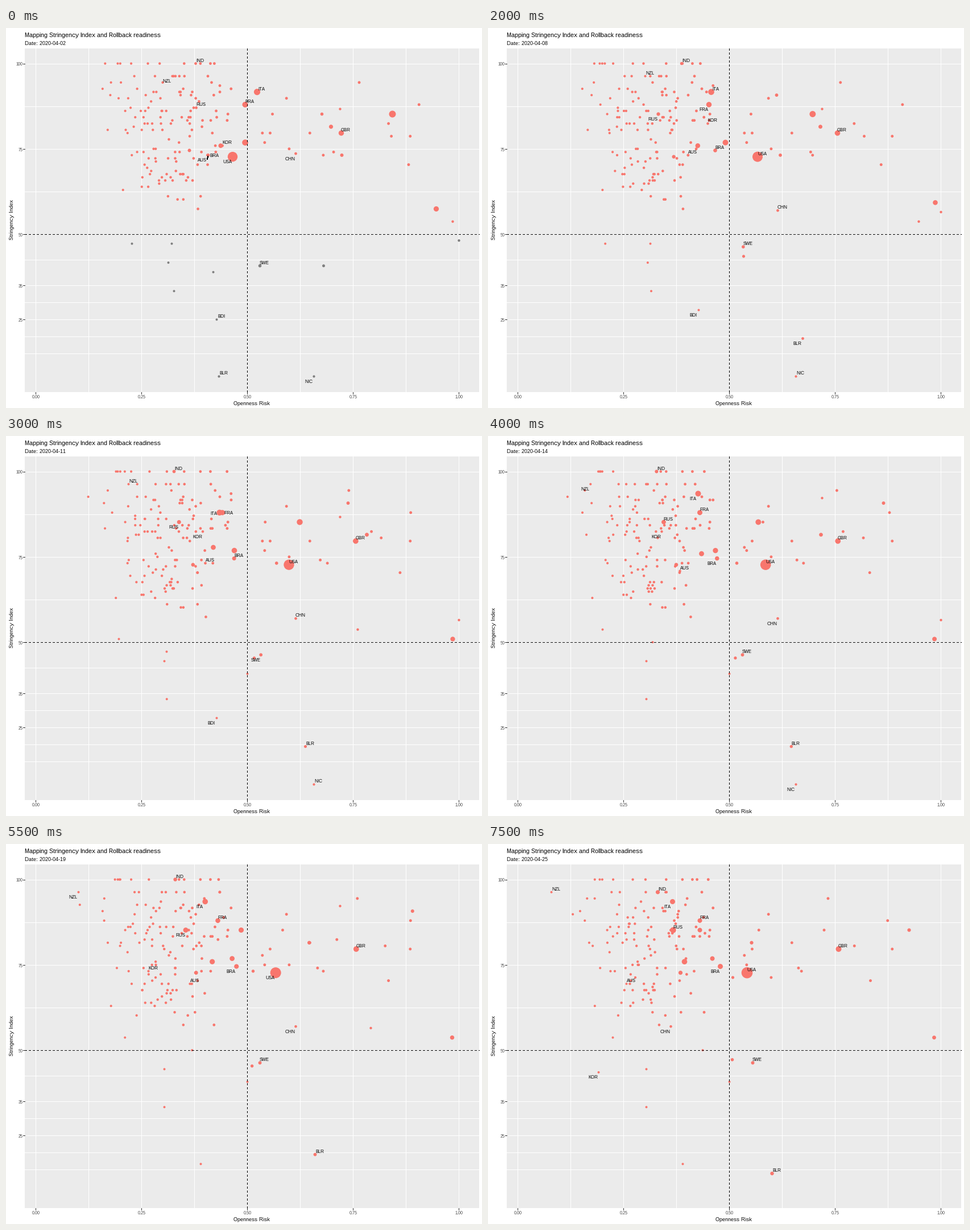
Recreate the animation shown at these times as a matplotlib script. Size 837 by 669 pixels, loop 8000 ms.

```python
import numpy as np
import matplotlib.pyplot as plt
from matplotlib.animation import FuncAnimation
from matplotlib.patches import Rectangle

W, H = 837, 669
FRAMES, STEP_MS = 16, 500
LEFT, RIGHT, TOP, BOTTOM = 33, 832, 35, 640
SALMON, GREY = "#F8766D", "#7F7F7F"
SIDES = {"n": (8, -6), "s": (-9.5, 8.5), "e": (11, 0), "w": (-10, 1)}
SIDE_TIMES = np.array([0, 2, 4, 6, 8, 11, 15])

rng = np.random.default_rng(11)
plt.rcParams.update({"font.family": "Liberation Sans",
                     "text.hinting": "native", "text.hinting_factor": 1})


def level_y(k):
    """The index moves in steps of 1/1.08 points below 100."""
    return 62 + 5.565 * np.asarray(k, float)


def index_y(v):
    return 62 + 6.01 * (100 - v)


def wander(x, k, stride, x_range, k_max):
    """Paths of many small dots: x drifts daily, the index hops now and then."""
    shape = (FRAMES, len(x))
    steps = rng.normal(-.12 * stride, stride, shape)
    steps *= rng.random(len(x)) < .65
    hops = rng.integers(-4, 5, shape) * (rng.random(shape) < .06)
    steps[0] = hops[0] = 0
    xs = np.clip(x + steps.cumsum(0), *x_range)
    ks = np.clip(k + hops.cumsum(0), 0, k_max)
    ks = np.where(ks < 3, 0, np.where(ks < 6, 4, ks))  # the top rows are sparse
    return xs, level_y(ks)


def make_crowd(n):
    """Dense upper left, narrower towards the low index values."""
    k = np.floor(54 * rng.beta(1.3, 2, n))
    x = 280 + 155 * (1 - k / 90) * rng.triangular(-1, .25, 1, n)
    return wander(x, k, 5, (69, 428), 52)


def make_stragglers(n):
    """Thin tail of dots to the right of the middle."""
    x = 428 + rng.exponential(95, n)
    return wander(x, rng.integers(6, 33, n), 9, (426, 796), 43)


class Track:
    """One country as (frame, x, index step) points, with optional label."""

    def __init__(self, name, radii, *points, sides="", last=FRAMES):
        self.name, self.radii, self.sides, self.last = name, radii, sides, last
        self.fs, self.xs, self.ks = zip(*points)
        self.text = ax.text(0, 0, name, size=8, ha="center",
                            va="center_baseline", zorder=6)

    def at(self, f):
        shown = self.fs[0] <= f <= self.last
        self.text.set_visible(shown and bool(self.name))
        if not shown:
            return []
        x = np.interp(f, self.fs, self.xs)
        y = level_y(self.ks[np.searchsorted(self.fs, f, "right") - 1])
        if self.name:
            side = self.sides[np.abs(SIDE_TIMES - f).argmin()]
            self.text.set_position((x + SIDES[side][0], y + SIDES[side][1]))
        return [(x, y, np.interp(f, [0, FRAMES - 1], self.radii))]


fig = plt.figure(figsize=(W / 72, H / 72), dpi=72, facecolor="white")
ax = fig.add_axes([0, 0, 1, 1])
ax.set(xlim=(-.5, W - .5), ylim=(H - .5, -.5))
ax.axis("off")


def line(xs, ys, color, **kw):
    return ax.plot(xs, ys, color=color, lw=1, antialiased=False,
                   solid_capstyle="butt", **kw)[0]


def label(x, y, s, size, color="black", ha="center", va="center_baseline", **kw):
    return ax.text(x, y, s, size=size, color=color, ha=ha, va=va, **kw)


# Panel, grid and axes
ax.add_patch(Rectangle((LEFT, TOP), RIGHT - LEFT, BOTTOM - TOP,
                       color="#EBEBEB", lw=0, zorder=0))
for n in range(9):
    x = 52 + 93 * n
    line([x, x], [TOP, BOTTOM], "white", zorder=1)
    if n % 2 == 0:
        line([x, x], [BOTTOM, BOTTOM + 3], "#333333")
        label(x, 649, f"{n / 8:.2f}", 8, "#4D4D4D")
for v in (100, 87.5, 75, 62.5, 50, 42.5, 35, 30, 25, 20, 15):
    y = index_y(v)
    line([LEFT, RIGHT], [y, y], "white", zorder=1)
    if v in (100, 75, 50, 35, 25):
        line([LEFT - 3, LEFT], [y, y], "#333333")
        label(29, y + 1, f"{v}", 8, "#4D4D4D", "right")
for xs, ys in (([424, 424], [BOTTOM, TOP]),
               ([LEFT, RIGHT], [index_y(50)] * 2)):
    line(xs, ys, "black", ls=(0, (3, 3)), zorder=5)
label(33, 11, "Mapping Stringency Index and Rollback readiness", 11, ha="left")
label(432, 660, "Openness Risk", 9)
label(10, 337, "Stringency Index", 9, rotation=90, va="center")
date = label(33, 26, "", 9, ha="left")
leader = line([355, 353], [225, 231], "black", zorder=6)

tracks = []


def add(*args, **kw):
    tracks.append(Track(*args, **kw))


# Labelled countries
add("IND", (2.4, 3.6), (0, 333, 0), (4, 340, 0), (6, 295, 0), (13, 298, 4),
    sides="nnnnnnn")
add("ITA", (5.6, 4.5), (0, 441, 9), (2, 409, 9), (6, 375, 13), (8, 369, 7),
    (15, 324, 7), sides="nnnwsss")
add("FRA", (5, 4), (0, 420, 13), (2, 414, 13), (4, 388, 13), (8, 372, 13),
    sides="nssennn")
add("RUS", (2.4, 5.2), (0, 334, 14), (2, 338, 14), (4, 299, 16), (15, 325, 16),
    sides="nsssnsn")
add("GBR", (4.7, 5), (0, 589, 22), (4, 614, 22), (15, 616, 22), sides="nsnnnnn")
add("USA", (8.7, 9.8), (0, 398, 29.5), (2, 450, 29.5), (6, 497, 29.5),
    (15, 455, 29.5), sides="ssnnnsn")
add("KOR", (2.4, 2), (0, 380, 26), (2, 381, 23), (4, 386, 19), (8, 305, 19),
    (11, 250, 29), (15, 194, 61), sides="nnnssns")
add("BRA", (2.9, 4.5), (0, 355, 29), (2, 355, 29), (4, 399, 27.5),
    (15, 408, 27.5), sides="eennsss")
add("AUS", (2.6, 2), (0, 354, 29), (6, 350, 29), (8, 337, 31.5), (11, 323, 33),
    (15, 243, 33), sides="ssnnnnn")
add("NZL", (2.1, 2), (0, 292, 4), (4, 276, 4), (6, 215, 4), (11, 127, 4),
    (15, 111, 4), sides="ssnnssn")
add("CHN", (2.4, 2.3), (0, 509, 28.5), (2, 509, 32.5), (4, 509, 46.5),
    (11, 509, 46.5), (15, 321, 46.5), sides="ssnnsss")
add("SWE", (2.8, 3), (0, 446, 64), (2, 449, 58), (11, 446, 58), (15, 465, 58),
    sides="nnnsnnn")
add("BDI", (2, 2), (0, 370, 81), (2, 370, 78), sides="nsssnnn", last=7)
add("BLR", (2.1, 3.2), (0, 374, 99), (2, 498, 87), (4, 553, 87), (6, 526, 87),
    (11, 543, 87), (12, 532, 93), (15, 499, 93), sides="nssnnnn")
add("NIC", (2.1, 2.1), (0, 541, 99), sides="ssnnsnn", last=8)

# Large dots without a label
add("", (5.3, 4), (0, 420, 25), (2, 433, 25), (6, 401, 25), (15, 394, 25))
add("", (6, 4), (0, 679, 16), (6, 516, 16), (11, 413, 16), (15, 372, 16))
add("", (4, 4.8), (0, 377, 26), (6, 364, 24), (8, 375, 26), (15, 345, 26))
add("", (3.6, 3.1), (0, 571, 20), (4, 584, 20), (6, 634, 20), (8, 585, 20),
    (15, 463, 20))
add("", (4.6, 3.4), (0, 756, 46), (2, 787, 44), (6, 785, 53), (11, 784, 50))
add("", (2.8, 3.1), (0, 555, 16), (2, 570, 16), (4, 507, 10), (8, 695, 10),
    (15, 740, 16))
add("", (3, 2.6), (0, 590, 29), (8, 437, 29), (15, 430, 31))
add("", (3, 3.6), (0, 322, 27.5), (2, 324, 29.5), (15, 338, 29.5))

# Outliers, mostly below the half-way line
add("", (2.5, 2.8), (0, 558, 64), (2, 462, 61), (6, 436, 59), (15, 429, 57))
add("", (2, 2), (0, 221, 57), (6, 198, 53), (8, 201, 50), (15, 219, 50))
add("", (2, 2), (0, 291, 57), (6, 282, 57), (8, 289, 54), (15, 377, 54))
add("", (2, 2), (0, 285, 63), (6, 278, 60))
add("", (2, 2), (0, 295, 72), (8, 278, 72))
add("", (2, 2), (0, 364, 66), (2, 351, 56), last=3)
add("", (2, 2), (6, 424, 64))
add("", (2, 2), (11, 342, 90))
add("", (2.2, 2.2), (0, 796, 56), (4, 796, 47), (8, 796, 47), (11, 641, 47),
    last=12)
add("", (2.2, 2.2), (0, 785, 50), (2, 759, 50), (4, 757, 50), (6, 618, 50),
    last=7)
add("", (2.2, 2.2), (0, 587, 14.4), (8, 587, 8.4), last=12)

swarms = [make_crowd(132), make_stragglers(15)]
cloud = ax.scatter([], [], linewidths=0, zorder=3)


def draw(f):
    parts = []
    for xs, ys in swarms:
        # dots grow slightly with the risk
        r = 2.05 + .4 * np.clip((xs[f] - 200) / 200, 0, 1)
        parts.append(np.column_stack([xs[f], ys[f], r]))
    parts.append([dot for t in tracks for dot in t.at(f)])
    x, y, r = np.vstack(parts).T
    cloud.set_offsets(np.column_stack([x, y]))
    cloud.set_sizes((2 * r) ** 2)
    low = (y > index_y(50) + 3) & (f < 4)
    cloud.set_facecolor(np.where(low, GREY, SALMON))
    leader.set_visible(f < 3)
    date.set_text(f"Date: 2020-04-{2 + int(.2 + 1.545 * f):02d}")
    return []


anim = FuncAnimation(fig, draw, frames=FRAMES, interval=STEP_MS,
                     repeat=True, repeat_delay=0)
plt.show()
```
